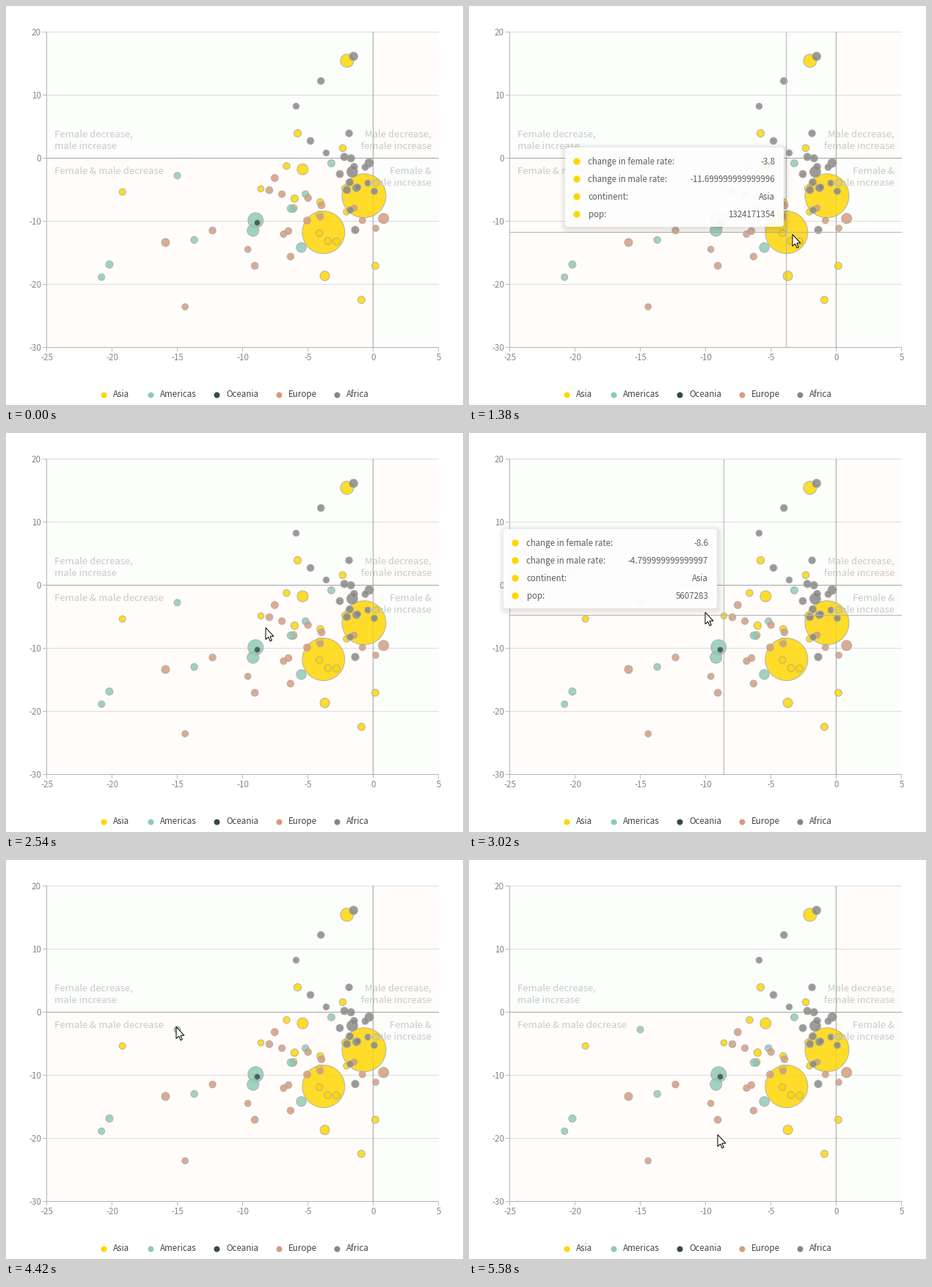
A matplotlib script for the animation above (5690 ms loop, 623x544 px).

```python
import numpy as np
import matplotlib.pyplot as plt
from matplotlib.animation import FuncAnimation
from matplotlib.collections import LineCollection
from matplotlib.patches import FancyBboxPatch, Polygon, Rectangle
from matplotlib.transforms import Affine2D

W, H, DPI = 623, 544, 64
PT = 72 / DPI                      # points per pixel
LOOP, TICK = 5690, 10
START, STEP = 520, 117.6           # the pointer enters, then moves in steps (ms)
LEFT, RIGHT, TOP, BOTTOM = 56, 590, 36, 466

plt.rcParams["font.family"] = "Noto Sans CJK JP"

COLORS = {"Asia": "#ffd500", "Americas": "#8dcab5", "Oceania": "#33494f",
          "Europe": "#d79a7b", "Africa": "#868686"}

# Countries that stand out: female change, male change, radius in px
KEY = {
    "Asia": [(-.7, -5.9, 30), (-3.8, -11.7, 29), (-2, 15.5, 9),
             (-5.4, -1.7, 7.5), (-3.7, -18.6, 6.5), (-.9, -22.4, 5),
             (-8.6, -4.8, 4.3), (-19.2, -5.3, 4.5)],
    "Americas": [(-9, -9.8, 10.5), (-9.2, -11.4, 8), (-5.5, -14.1, 6.7),
                 (-15, -2.7, 4.5), (-13.7, -12.9, 4.7), (-20.2, -16.8, 5),
                 (-20.8, -18.8, 4.5)],
    "Oceania": [(-8.9, -10.1, 4)],
    "Europe": [(-15.9, -13.3, 5.5), (-14.4, -23.5, 4.3), (.8, -9.5, 7),
               (-12.3, -11.4, 4.7), (-9.6, -14.4, 4.3)],
    "Africa": [(-1.5, 16.2, 5.8), (-4, 12.3, 4.8), (-5.9, 8.3, 4.3),
               (-4.8, 2.8, 4.8), (-1.6, -2.1, 7.5), (-.3, -.7, 6)],
}
# The crowd of small ones: count, centre, spread
CROWD = {"Asia": (14, (-2.8, -7.8), (2, 6)),
         "Americas": (4, (-4.7, -5), (2, 5)),
         "Oceania": (0, (0, 0), (1, 1)),
         "Europe": (14, (-4, -10.5), (3, 4)),
         "Africa": (15, (-1.9, -4.5), (1.2, 4))}

# Pointer path: step, x, y
PATH = np.array([
    (0, 455, 477), (3, 449, 317), (4, 441, 311), (8, 441, 311), (10, 383, 299),
    (11, 345, 294), (13, 340, 293), (17, 354, 265), (20, 350, 249),
    (24, 238, 231), (27, 217, 220), (28, 217, 220), (30, 232, 227),
    (40, 232, 227), (43, 339, 374)])

# Tooltips: first step, end step, values
WEST = ("-15", "-2.6999999999999957", "Americas", "11475982")
TIPS = [
    (3, 11, ("-3.8", "-11.699999999999996", "Asia", "1324171354")),
    (11, 16, ("-9", "-9.800000000000004", "Americas", "323127513")),
    (20, 23, ("-8.6", "-4.799999999999997", "Asia", "5607283")),
    (24, 27, WEST),
    (34, 42, WEST),
]
FIELDS = ("change in female rate:", "change in male rate:", "continent:", "pop:")


def px(v):
    return LEFT + (v + 25) * (RIGHT - LEFT) / 30


def py(v):
    return TOP + (20 - v) * (BOTTOM - TOP) / 50


fig = plt.figure(figsize=(W / DPI, H / DPI), dpi=DPI, facecolor="white")
ax = fig.add_axes([0, 0, 1, 1])
ax.set(xlim=(0, W), ylim=(H, 0))
ax.axis("off")


def label(x, y, s, size=11.6, color="#888888", ha="left", z=2, **kw):
    return ax.text(x, y, s, fontsize=size * PT, color=color, ha=ha,
                   va="baseline", zorder=z, **kw)


def lines(segs, color, z):
    coll = LineCollection(segs, colors=color, linewidths=PT, zorder=z,
                          capstyle="butt", snap=False)
    return ax.add_collection(coll, autolim=False)


def dots(x, y, r, color, z, **kw):
    return ax.scatter(x, y, s=(2 * np.asarray(r) * PT) ** 2, c=color,
                      zorder=z, **kw)


def draw_axes():
    x0, y0 = px(0), py(0)
    green, pink = "#fbfefb", "#fffcfa"
    for x, y, w, h, c in ((LEFT, TOP, x0 - LEFT, y0 - TOP, green),
                          (x0, TOP, RIGHT - x0, y0 - TOP, pink),
                          (LEFT, y0, x0 - LEFT, BOTTOM - y0, pink),
                          (x0, y0, RIGHT - x0, BOTTOM - y0, green)):
        ax.add_patch(Rectangle((x, y), w, h, fc=c, lw=0, zorder=0))

    for v in range(-25, 6, 5):
        x = px(v) - .5
        lines([[(x, BOTTOM), (x, BOTTOM + 5)]], "#bbbbbb", 1)
        label(x + .5, 483, str(v), ha="center")
    for v in range(20, -31, -10):
        y = py(v) - .5
        lines([[(LEFT, y), (RIGHT, y)]], "#dddddd", 1)
        lines([[(LEFT - 6, y), (LEFT - 1, y)]], "#bbbbbb", 1)
        label(48, y + 4, str(v), ha="right")
    for x, y, c in ((LEFT, BOTTOM, "#b4b4b4"), (x0, y0, "#a3a5a3")):
        lines([[(x - .5, TOP - 1), (x - .5, BOTTOM)],
               [(LEFT - 1, y - .5), (RIGHT, y - .5)]], c, 1.2)


def draw_quadrants():
    for x, ha, texts in (
            (66, "left", ("Female decrease,", "male increase",
                          "Female & male decrease")),
            (580, "right", ("Male decrease,", "female increase",
                            "Female &", "male increase"))):
        for y, s in zip((179, 195, 229, 245), texts):
            label(x, y, s, size=13.2, color="#c9c9c9", ha=ha, z=4)


def draw_bubbles():
    rng = np.random.default_rng(4)
    for k, color in COLORS.items():
        n, mean, sd = CROWD[k]
        xy = np.clip(rng.normal(mean, sd, (n, 2)), (-13, -17), (.2, 4))
        crowd = np.column_stack([xy, rng.uniform(4.2, 5.2, n)])
        x, y, r = np.vstack([KEY[k], crowd]).T
        dots(px(x) - .5, py(y), r, color, 3, alpha=.83, edgecolors="#a8a8a8",
             linewidths=PT)


def draw_legend():
    for x, (s, color) in zip((133, 197, 287, 372, 451), COLORS.items()):
        dots([x], [529.5], [4], color, 2, linewidths=0)
        label(x + 13, 533, s, color="#444444")


class Tooltip:
    H = 108

    def __init__(self):
        self.shift = Affine2D()
        tf = self.shift + ax.transData
        self.boxes = [self.box(p, "black", .013, tf) for p in range(8, 0, -1)]
        self.boxes.append(self.box(0, "white", .95, tf))
        ys = 19 + 24 * np.arange(4)
        self.dots = dots([16] * 4, ys, [4.6] * 4, "k", 8, linewidths=0,
                         transform=tf)
        style = dict(size=11.5, color="#5f5f5f", z=8, transform=tf)
        names = [label(31.5, y + 4, s, **style) for y, s in zip(ys, FIELDS)]
        self.values = [label(0, y + 4, "", ha="right", **style) for y in ys]
        self.parts = self.boxes + [self.dots] + names + self.values

    def box(self, pad, color, alpha, tf):
        d = 1 if pad else 0
        patch = FancyBboxPatch((d - pad, 2 * d - pad), 1, self.H + 2 * pad,
                               fc=color, alpha=alpha, lw=0, zorder=7,
                               boxstyle=f"round,pad=0,rounding_size={4 + pad}",
                               transform=tf)
        patch.pad = pad
        return ax.add_patch(patch)

    def show(self, x, y, values):
        """Stand above the pointer, on its left if the right side is too narrow."""
        width = 165 + 7 * len(values[1])
        x = x + 8 if x + 8 + width < W else x - width - 12
        self.shift.clear().translate(round(x), round(y - self.H - 10))
        for b in self.boxes:
            b.set_width(width + 2 * b.pad)
        self.dots.set_facecolor(COLORS[values[2]])
        for text, v in zip(self.values, values):
            text.set_text(v)
            text.set_x(width - 12)
        self.visible(True)

    def visible(self, on):
        for p in self.parts:
            p.set_visible(on)


draw_axes()
draw_bubbles()
draw_quadrants()
draw_legend()
tooltip = Tooltip()
cross = lines([], "#b4b4b4", 5)
cursor_shift = Affine2D()
cursor = ax.add_patch(Polygon(
    [(0, .5), (0, 16.5), (3.7, 13.2), (6.1, 18.8), (8.3, 17.8), (6, 12.2),
     (11, 12.2)], closed=True, fc="white", ec="black", lw=PT, zorder=9,
    transform=cursor_shift + ax.transData))


def pointer(n):
    return [np.interp(n, PATH[:, 0], PATH[:, k]) for k in (1, 2)]


def draw(i):
    n = int((i * TICK - START) // STEP)
    cursor.set_visible(n >= 0)
    x, y = pointer(n)
    cursor_shift.clear().translate(round(x), round(y))

    values = next((v for a, b, v in TIPS if a <= n < b), None)
    cross.set_visible(values is not None)
    if values is None:
        tooltip.visible(False)
        return []
    tooltip.show(*pointer(n - 1), values)   # trails one step behind
    cx = round(px(float(values[0]))) - .5
    cy = round(py(float(values[1]))) - .5
    cross.set_segments([[(cx, TOP), (cx, BOTTOM)], [(LEFT, cy), (RIGHT, cy)]])
    return []


anim = FuncAnimation(fig, draw, frames=LOOP // TICK, interval=TICK,
                     repeat=True, repeat_delay=0, init_func=lambda: draw(0))
plt.show()
```
